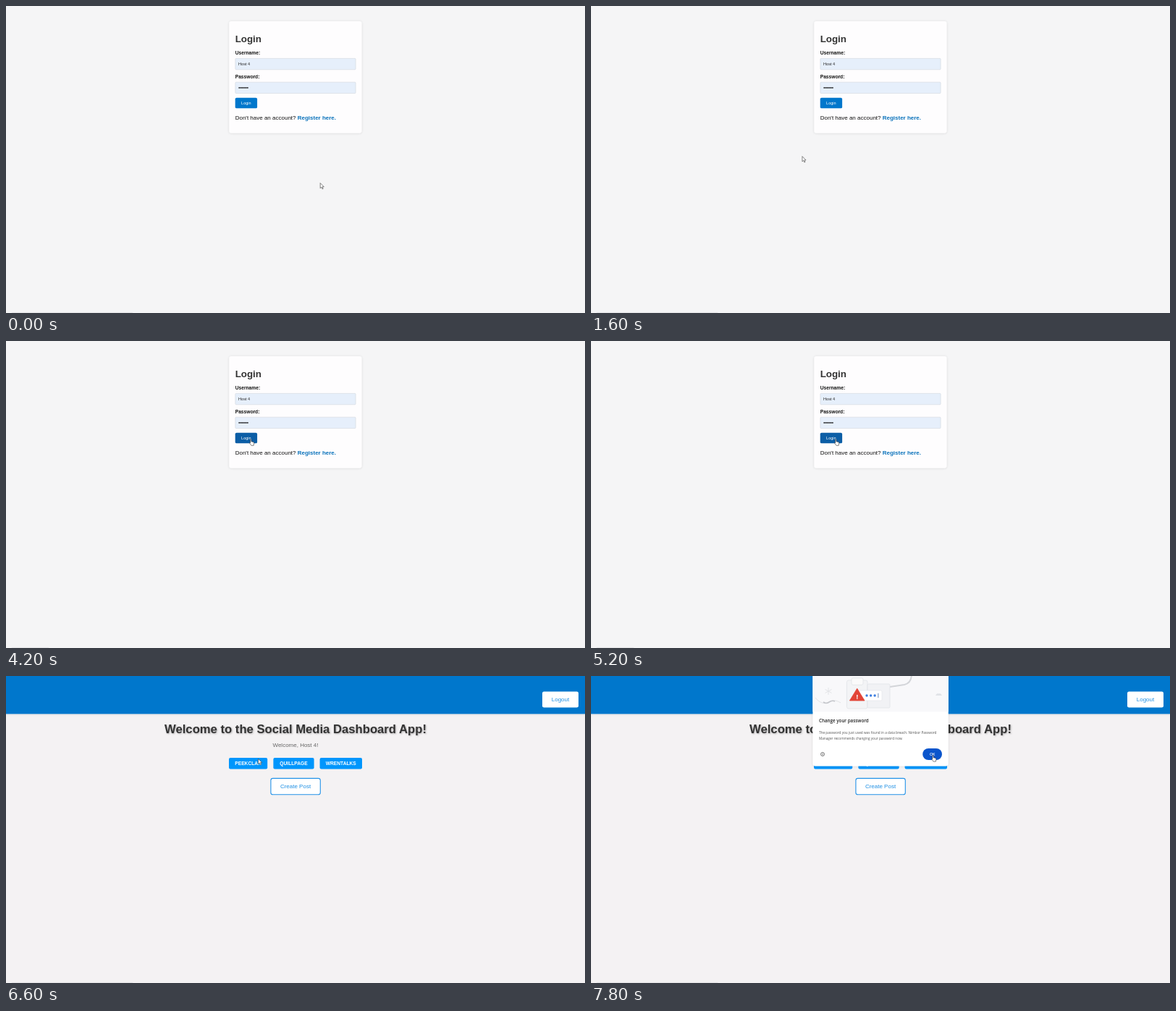
Animation of 800x424 px, one loop 8 s. Source, as an HTML page:

```html
<!DOCTYPE html>
<html lang="en">
<head>
<meta charset="utf-8">
<title>Login and dashboard</title>
<style>
  html, body { margin: 0; width: 100%; height: 100%; overflow: hidden; background: #f5f5f6; }
  svg { display: block; width: 800px; height: 424px; font-family: "Liberation Sans", Arial, sans-serif; }
  .bold { font-weight: bold; }
  .mid { text-anchor: middle; }
  .dialog text { font-family: "Open Sans", "Noto Sans", sans-serif; }
  .line { fill: none; stroke: #e3e4e7; stroke-width: 1; }
</style>
</head>
<body>
<svg id="stage" viewBox="0 0 800 424"></svg>
<script>
const LOOP = 8000, STEP = 200;
const USER = 'Host 4';
const BLUE = '#0077cc', BRIGHT = '#0096fc', DARK = '#0c5ea6';

const text = (x, y, size, fill, str, cls = '') =>
  `<text x="${x}" y="${y}" font-size="${size}" fill="${fill}" class="${cls}">${str}</text>`;
const rect = (x, y, w, h, r, fill, extra = '') =>
  `<rect x="${x}" y="${y}" width="${w}" height="${h}" rx="${r}" fill="${fill}" ${extra}/>`;
const circle = (x, y, r, fill, extra = '') =>
  `<circle cx="${x}" cy="${y}" r="${r}" fill="${fill}" ${extra}/>`;
const field = y => rect(316.9, y, 166.2, 15.4, 1, '#e6effb', 'stroke="#c9ced6" stroke-width=".5"');
const tab = (x, w, str) =>
  rect(x, 77, w, 15.6, 2, BRIGHT) + text(x + w / 2, 87.1, 6.67, '#fff', str, 'bold mid');
const bullets = Array.from({ length: 7 }, (_, i) => circle(322.2 + i * 1.95, 112.9, .85, '#111')).join('');

const login = `
  ${rect(0, 0, 800, 424, 0, '#f5f5f6')}
  ${rect(308.3, 21, 183.2, 154.5, 3.3, '#fefdfe', 'filter="url(#soft)"')}
  ${text(316.7, 50, 13.33, '#333', 'Login', 'bold')}
  ${text(316.7, 67.4, 6.67, '#111', 'Username:', 'bold')}
  ${field(72.4)}
  ${text(321.1, 82.2, 5.56, '#222', USER)}
  ${text(316.7, 100, 6.67, '#111', 'Password:', 'bold')}
  ${field(105.2)}
  ${bullets}
  ${rect(316.7, 126.7, 30.4, 14.6, 1.9, BLUE, 'id="submit"')}
  ${text(331.9, 136, 5.56, '#fff', 'Login', 'mid')}
  ${text(316.7, 156.8, 8, '#111', "Don't have an account?")}
  ${text(402.7, 156.8, 8, '#0a72bb', 'Register here.', 'bold')}`;

const dashboard = `
  ${rect(0, 0, 800, 424, 0, '#f4f2f3')}
  ${rect(0, -20, 800, 36.5, 0, BLUE, 'id="header" filter="url(#soft)"')}
  <g id="content">
    <g filter="url(#textShade)">${text(400, 43, 16.67, '#333', 'Welcome to the Social Media Dashboard App!', 'bold mid')}</g>
    <text id="intro" x="400" y="62" font-size="8" fill="#666" class="mid"></text>
    ${tab(308, 53.2, 'PEEKCLAN')}${tab(369.4, 56.2, 'QUILLPAGE')}${tab(433.6, 58.4, 'WRENTALKS')}
  </g>
  <g id="member">
    ${rect(365.9, 141.4, 68.4, 22.4, 2.8, '#fff', 'stroke="#2493e8" stroke-width="1.1"')}
    ${text(400, 155.2, 8, '#1f90e4', 'Create Post', 'mid')}
    ${rect(741, 21.4, 50, 22.2, 2.4, '#fff')}
    ${text(766, 35.2, 8, '#1f90e4', 'Logout', 'mid')}
  </g>`;

const dialog = `
  ${rect(306.4, -8, 187.4, 132.5, 4, '#fff', 'filter="url(#soft)"')}
  ${rect(306.4, -1, 187.4, 50.3, 0, '#f8f8fa')}
  <path class="line" stroke-width="2" d="M310 30c6 8 14 9 19 6s9-3 16 1"/>
  <path class="line" style="stroke:#c5c7cc;stroke-width:1.6" d="M321 36q4 3 8 0t8-1"/>
  <path class="line" d="M328 16v10M323.5 18.5l9 5M323.5 23.5l9-5"/>
  <path class="line" style="stroke:#d3d5d9;stroke-width:2" d="M387 13q12 4 26 2t20-3q9-2 10-13"/>
  ${rect(353.4, 6, 28.6, 39, 2.5, '#f3f4f6', 'stroke="#dfe1e5" stroke-width=".7"')}
  ${rect(360, 2.8, 16, 9.5, 2, '#fafafa', 'stroke="#dfe1e5" stroke-width=".7"')}
  ${rect(382, 11, 31, 33, 1.5, '#f1f2f5', 'stroke="#dfe1e5" stroke-width=".7"')}
  ${rect(366, 20, 36, 14, 1.5, '#fff', 'stroke="#e1e3e7" stroke-width=".6"')}
  <path d="M367.7 17.2L378 34H357.4z" fill="#e24436" stroke="#e24436" stroke-width=".8" stroke-linejoin="round"/>
  ${text(367.7, 31.5, 9, '#fff', '!', 'bold mid')}
  ${[381, 386.6, 392.1].map(x => circle(x, 27, 1.7, '#3e7fe0')).join('')}
  ${rect(396.4, 23.8, .9, 6.2, 0, '#587bb0')}
  <path d="M476 27q2-4 4.5-2.5Q483 23 485 27z" fill="#e1e3e7"/>
  ${text(315, 64.2, 6.25, '#222', 'Change your password').replace('<text', '<text font-weight="600"')}
  ${text(315, 79.5, 4.7, '#555', 'The password you just used was found in a data breach. Nimbor Password')}
  ${text(315, 87.7, 4.7, '#555', 'Manager recommends changing your password now.')}
  ${circle(320, 108, 2.5, 'none', 'stroke="#444" stroke-width=".7"')}
  ${rect(319.7, 106.8, .7, 2.5, 0, '#444')}
  ${rect(458.2, 100, 26.8, 16, 8, '#0b57d0', 'id="ok"')}
  ${text(471.6, 110.1, 5.2, '#fff', 'OK', 'mid').replace('<text', '<text font-weight="600"')}`;

const stage = document.getElementById('stage');
stage.innerHTML = `
  <defs>
    <filter id="soft" x="-10%" y="-10%" width="120%" height="130%">
      <feDropShadow dx="0" dy=".4" stdDeviation="1.7" flood-opacity=".13"/>
    </filter>
    <filter id="textShade" x="-5%" y="-30%" width="110%" height="170%">
      <feDropShadow dx=".9" dy=".9" stdDeviation=".8" flood-opacity=".3"/>
    </filter>
  </defs>
  <g id="login">${login}</g>
  <g id="dashboard">${dashboard}</g>
  <g id="dialog" class="dialog">${dialog}</g>
  ${rect(7.5, 422.9, 168, 4, 1, '#e3e3e5', 'id="status"')}
  <g id="cursor">
    <path id="arrow" d="M0 0v7.2l1.7-1.6 1.2 2.7 1.1-.5-1.1-2.6h2.2z" fill="#fff" stroke="#444" stroke-width=".65"/>
    <path id="hand" d="M1.2 .6q.8-.9 1.3.2v2.6l3 .8q.9.3.8 1.3l-.5 3.4H2.5L.1 5.7q0-1 1.1-.3z" fill="#fff" stroke="#222" stroke-width=".55"/>
  </g>`;

const el = id => document.getElementById(id);
const show = (id, on) => el(id).setAttribute('display', on ? 'inline' : 'none');
const set = (id, name, value) => el(id).setAttribute(name, value);

// Pointer stops: time, x, y
const stops = [
  [0, 434.2, 244.5], [750, 333.2, 132.6], [1200, 333.2, 132.6], [2400, 174, 422],
  [2800, 174, 422], [4000, 336.8, 134.6], [4200, 336.4, 135.4], [5400, 336.4, 135.4],
  [6000, 337.6, 134.4], [6200, 337.6, 134.4], [6600, 348.6, 114.4],
  [7000, 380, 118], [7800, 470.6, 109.2], [8000, 470.6, 109.2]
];

function pointerAt(t) {
  const i = stops.findIndex(s => s[0] > t);
  const [t0, x0, y0] = stops[i - 1], [t1, x1, y1] = stops[i];
  const p = (t - t0) / (t1 - t0), e = p * p * (3 - 2 * p);
  return [x0 + (x1 - x0) * e, y0 + (y1 - y0) * e];
}

const inside = (x, y, l, t, r, b) => x >= l && x <= r && y >= t && y <= b;

function draw(time) {
  const t = Math.floor(time / STEP) * STEP;
  const [x, y] = pointerAt(t);
  const onLogin = t < 6000, member = t >= 6400, warned = t >= 7000;

  show('login', onLogin);
  show('dashboard', !onLogin);
  show('member', member);
  show('dialog', warned);

  const overSubmit = onLogin && inside(x, y, 316.7, 126.7, 347, 141.3);
  const pressed = t === 800 || (t >= 4800 && t < 5200);
  set('submit', 'fill', overSubmit ? DARK : BLUE);
  set('submit', 'stroke', overSubmit && pressed ? '#2a86d0' : 'none');
  set('submit', 'stroke-width', .8);

  set('header', 'height', member ? 72.4 : 36.5);
  set('content', 'transform', `translate(0 ${member ? 36 : 0})`);
  el('intro').textContent = member
    ? `Welcome, ${USER}!`
    : 'Explore and manage your social media accounts in one place.';

  const overOk = warned && inside(x, y, 458, 100, 485, 116);
  set('ok', 'fill', overOk ? '#0a55cc' : '#0b57d0');

  set('status', 'width', t < 3000 || t >= 6600 ? 168 : onLogin ? 52 : 0);
  set('cursor', 'transform', `translate(${x} ${y})`);
  show('hand', overSubmit || overOk);
  show('arrow', !overSubmit && !overOk);
}

const start = performance.now();
function tick() {
  draw((performance.now() - start) % LOOP);
  requestAnimationFrame(tick);
}
tick();
</script>
</body>
</html>
```
